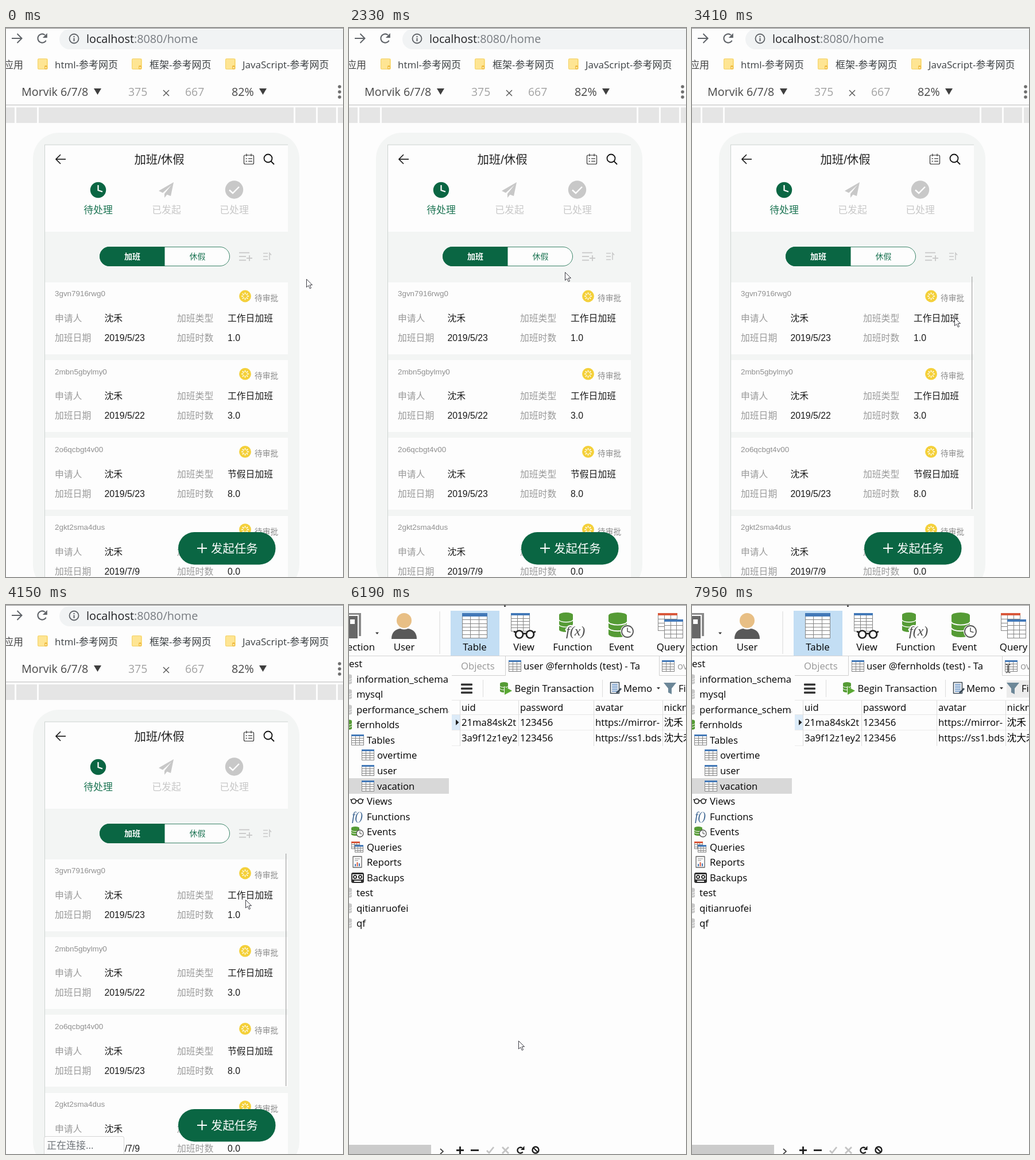
An HTML page with a canvas that plays this animation: 587x954 px, repeating every 8000 ms.

```html
<!DOCTYPE html>
<html lang="zh-CN">
<head>
<meta charset="utf-8">
<title>Screen recording</title>
<style>
html, body { margin: 0; width: 587px; height: 954px; overflow: hidden; background: #fdfdfd; }
canvas { display: block; }
</style>
</head>
<body>
<canvas id="stage" width="587" height="954"></canvas>
<script>
const c = document.getElementById('stage').getContext('2d');
const LOOP = 8000, TAU = Math.PI * 2;
const UI = '"Open Sans","Noto Sans CJK SC","Noto Sans CJK",sans-serif';
const PAGE = '"Liberation Sans","Noto Sans CJK SC","Noto Sans CJK",sans-serif';
const BG = '#fdfdfd', PALE = '#f3f5f4', GREEN = '#0a6643', DBGREEN = '#559b35', BLUE = '#4379b8', RED = '#d9583b';

// ---------- helpers ----------
function rect(x, y, w, h, col) { c.fillStyle = col; c.fillRect(x, y, w, h); }
function pill(x, y, w, h, r, col) {
  c.beginPath(); c.roundRect(x, y, w, h, r); c.fillStyle = col; c.fill();
}
function outline(x, y, w, h, r, col, lw = 1) {
  c.beginPath(); c.roundRect(x, y, w, h, r); c.strokeStyle = col; c.lineWidth = lw; c.stroke();
}
function disc(x, y, r, col) { c.beginPath(); c.arc(x, y, r, 0, TAU); c.fillStyle = col; c.fill(); }
function ring(x, y, r, col, w = 1.5, a = 0, b = TAU) {
  c.beginPath(); c.arc(x, y, r, a, b); c.strokeStyle = col; c.lineWidth = w; c.stroke();
}
function trace(p) {
  c.beginPath();
  for (let i = 0; i < p.length; i += 2) c.lineTo(p[i], p[i + 1]);
}
function line(p, col, w = 1) { trace(p); c.strokeStyle = col; c.lineWidth = w; c.stroke(); }
function poly(p, col) { trace(p); c.closePath(); c.fillStyle = col; c.fill(); }
// y is the middle of the capitals
function text(s, x, y, size, col, font = UI, weight = 400, align = 'left') {
  c.font = weight + ' ' + size + 'px ' + font;
  c.textAlign = align;
  c.fillStyle = col;
  c.fillText(s, x, Math.round(y + size * 0.36));
}
function clip(x, y, w, h, draw) {
  c.save(); c.beginPath(); c.rect(x, y, w, h); c.clip(); draw(); c.restore();
}

// ---------- cursor ----------
// [start, end, steps, x0, y0, x1, y1, ...]
const moves = [
  [270, 810, 5, 523, 436, 376, 396, 440, 500, 535, 587],
  [1370, 2330, 8, 535, 587, 376, 424],
  [2450, 2960, 5, 376, 424, 457, 503],
  [4150, 4150, 1, 457, 503, 417, 512],
  [4290, 5100, 7, 417, 512, 260, 259],
  [5530, 5930, 4, 260, 259, 300, 980],
  [6170, 6450, 3, 217, 847, 451, 577],
  [6610, 6610, 1, 451, 577, 620, 240],
  [6990, 7950, 7, 602, 225, 580, 180, 560, 146, 550, 110]
];
function cursorAt(t) {
  let pos = [523, 436];
  for (const [t0, t1, n, ...p] of moves) {
    if (t < t0) break;
    const step = n > 1 ? (t1 - t0) / (n - 1) : 1;
    const k = Math.min(n, 1 + Math.floor((t - t0) / step + 1e-6));
    const legs = p.length / 2 - 1, u = k / n * legs;
    const i = Math.min(legs - 1, Math.floor(u)), f = u - i;
    pos = [0, 1].map(a => p[2 * i + a] + (p[2 * i + 2 + a] - p[2 * i + a]) * f);
  }
  return pos.map(Math.round);
}
function drawCursor(x, y, beam) {
  c.save();
  c.translate(x + 0.5, y + 0.5);
  if (beam) {
    line([-4, -7, -1, -7, 0, -6, 1, -7, 4, -7], '#222');
    line([0, -6, 0, 6], '#222', 1.6);
    line([-4, 7, -1, 7, 0, 6, 1, 7, 4, 7], '#222');
  } else {
    poly([0, 0, 0, 14, 3.3, 11, 5.8, 16.3, 8, 15.3, 5.6, 10.2, 10, 10], '#fff');
    c.closePath();
    c.strokeStyle = '#3c3c44'; c.lineWidth = 1; c.stroke();
  }
  c.restore();
}

// ---------- browser ----------
function folder(x) {
  pill(x, 53, 18, 19, 2, '#fee593');
  outline(x + 0.5, 53.5, 16, 18, 2, '#f3d165');
  pill(x + 12, 65, 5, 7, 2, '#f0bd45');
  disc(x + 14.5, 69, 1.3, '#fff3c4');
}
function browser(path, loading, canForward) {
  const ink = '#5f6368', fwd = canForward ? ink : '#bdc0c3';
  line([10, 18, 27, 18], fwd, 2);
  line([19.5, 10, 27.5, 18, 19.5, 26], fwd, 2);
  if (loading) {
    line([57, 12, 69, 24], ink, 2);
    line([69, 12, 57, 24], ink, 2);
  } else {
    ring(63, 18, 7.6, ink, 2.1, 0.5, 5.4);
    poly([71.8, 9, 71.8, 17, 63.8, 17], ink);
  }
  pill(93, 2, 530, 35, 17.5, '#f1f3f4');
  ring(118.5, 18.5, 8, ink, 1.8);
  rect(117.5, 17.5, 2, 5.5, ink);
  rect(117.5, 14, 2, 2, ink);
  text('localhost', 140, 18.5, 19.8, '#202124');
  text(':8080/' + path, 140 + c.measureText('localhost').width, 18.5, 19.8, '#777b80');

  text('应用', -4, 63.5, 17, '#444');
  [[55, 85, 'html-参考网页'], [219, 250, '框架-参考网页'], [382, 412, 'JavaScript-参考网页']].forEach(([fx, x, s]) => {
    folder(fx);
    text(s, x, 63.5, 17, '#3c4043');
  });

  text('Morvik 6/7/8', 27, 111, 19.7, '#484848');
  text('375', 213, 111, 19.4, '#a3a3a3');
  line([274, 108, 284, 118], '#5a5a5a', 1.5);
  line([284, 108, 274, 118], '#5a5a5a', 1.5);
  text('667', 312, 111, 19.4, '#a3a3a3');
  text('82%', 393, 111, 19.7, '#484848');
  for (const x of [153, 441]) poly([x, 105, x + 13, 105, x + 6.5, 116], '#3f3f3f');
  for (const y of [102, 111, 120]) disc(581, y, 2.8, '#6e6e6e');
  rect(0, 133, 587, 1.5, '#cdcdcd');

  rect(0, 138, 587, 27, '#e5e5e5');
  for (const x of [15, 54, 501, 540, 575]) rect(x, 138, 3, 27, BG);

  pill(47, 182, 464, 796, 45, PALE);
  rect(67, 202.5, 424, 760, '#cdd4d1');
  rect(68, 203.5, 423, 760, BG);
}

// ---------- overtime list ----------
const cards = [
  ['3gvn7916rwg0', '工作日加班', '2019/5/23', '1.0'],
  ['2mbn5gbylmy0', '工作日加班', '2019/5/22', '3.0'],
  ['2o6qcbgt4v00', '节假日加班', '2019/5/23', '8.0'],
  ['2gkt2sma4dus', '工作日加班', '2019/7/9', '0.0']
];
function card([id, type, date, hours], y) {
  const label = '#999', ink = '#1a1a1a';
  rect(68, Math.round(y), 423, 125, BG);
  text(id, 85, y + 19.5, 13.4, '#909090', PAGE);
  disc(416.5, y + 24, 10.4, '#f4d03a');
  for (let i = 0; i < 8; i++) {
    const a = i * TAU / 8, x = Math.cos(a), v = Math.sin(a);
    line([416.5 + x * 3.2, y + 24 + v * 3.2, 416.5 + x * 6.4, y + 24 + v * 6.4], '#fff', 1.6);
  }
  text('待审批', 433, y + 27, 13.7, '#8a8a8a', PAGE);
  text('申请人', 85, y + 62.5, 15.8, label, PAGE);
  text('沈禾', 171.5, y + 62.5, 15.8, ink, PAGE);
  text('加班类型', 298, y + 62.5, 15.8, label, PAGE);
  text(type, 386, y + 62.5, 15.8, ink, PAGE);
  text('加班日期', 85, y + 96.5, 15.8, label, PAGE);
  text(date, 171.5, y + 96.5, 15.8, ink, PAGE);
  text('加班时数', 298, y + 96.5, 15.8, label, PAGE);
  text(hours, 386, y + 96.5, 15.8, ink, PAGE);
}
function home() {
  const grey = '#c8c8c8';
  line([87, 228, 104, 228], '#111', 1.6);
  line([95, 220, 87, 228, 95, 236], '#111', 1.6);
  text('加班/休假', 267, 228.5, 20.4, '#222', PAGE, 400, 'center');
  outline(414.5, 221, 17, 15.5, 2, '#333', 1.2);
  line([419, 218.5, 419, 223], '#333', 1.2);
  line([427, 218.5, 427, 223], '#333', 1.2);
  for (const y of [227, 231.5]) {
    line([417.5, y, 420, y], '#333', 1.2);
    line([422, y, 429, y], '#333', 1.2);
  }
  ring(456.5, 226.5, 7, '#111', 1.8);
  line([461.5, 231.5, 467, 237], '#111', 1.8);

  disc(160.5, 281.5, 13.7, GREEN);
  line([160.5, 273, 160.5, 282, 168, 284.5], '#fff', 2.2);
  poly([292, 268, 266, 283, 273, 286.5, 288, 273, 276, 288, 276, 295, 280.5, 289.5, 287, 292], grey);
  disc(397.5, 281, 15.7, grey);
  line([389, 281.5, 395, 287, 406, 276], '#fff', 2.4);
  [['待处理', 160.5, '#1c7453'], ['已发起', 279.5, grey], ['已处理', 397.5, grey]].forEach(([s, x, col]) =>
    text(s, x, 315.5, 16.9, col, PAGE, 400, 'center'));

  rect(68, 354, 423, 610, PALE);
  pill(163, 380, 227, 34, 17, BG);
  outline(163.5, 380.5, 226, 33, 16.5, '#3a8468');
  pill(163, 380, 113.5, 34, [17, 0, 0, 17], GREEN);
  text('加班', 220, 397, 14, '#fff', PAGE, 700, 'center');
  text('休假', 333.5, 397, 14, '#1c7453', PAGE, 400, 'center');
  for (const [x, y] of [[424, 390.5], [418, 397], [418, 403.5]]) line([406, y, x, y], grey, 1.8);
  line([419, 400, 429, 400], grey, 1.8);
  line([424, 395, 424, 405], grey, 1.8);
  for (const y of [391.5, 397, 402.5]) line([448, y, 456, y], grey, 1.5);
  line([459, 403, 459, 391, 462, 394.5], grey, 1.5);

  cards.forEach((d, i) => card(d, 442 + i * 135.2));

  pill(300, 876, 169.5, 56.5, 28, GREEN);
  line([333, 904, 350, 904], '#fff', 2);
  line([341.5, 895.5, 341.5, 912.5], '#fff', 2);
  text('发起任务', 357, 905, 20.4, '#fff', PAGE);
}
function connecting() {
  pill(66, 923, 140, 40, 4, '#d5d5d5');
  pill(67, 924, 138, 40, 3, BG);
  text('正在连接...', 71, 939, 17, '#70757a');
}

function menu(x, y) {
  c.save();
  c.shadowColor = 'rgba(0,0,0,.45)'; c.shadowBlur = 4; c.shadowOffsetY = 2;
  rect(377, 423, 220, 403, '#b9b9b9');
  c.restore();
  rect(378, 424, 220, 401, BG);
  const rows = [
    [446, '返回(B)'], [477, '前进(F)'], [508.5, '重新加载(R)'], [555.5, '另存为(A)...'],
    [587, '打印(P)...'], [618.5, '投射(C)...'], [650, '翻成中文（简体）(T)'],
    [696.5, '当前页地址生成二维码'], [728, 'JSONView'], [775, '查看网页源代码(V)'], [806, '检查(N)']
  ];
  for (const [cy, s] of rows) {
    if (x > 378 && Math.abs(y - cy) < 15.5) rect(378, Math.floor(cy - 17), 209, 32, '#e8e9ed');
    text(s, 421.5, cy, 16.8, '#111');
  }
  for (const cy of [529, 671, 749]) rect(379, cy, 208, 1, '#e3e3e3');
  rect(389.5, 685, 22, 22, '#23982a');
  disc(400, 727, 11, '#85a1cb');
}

// ---------- login ----------
function login(caret) {
  text('手机号码', 90, 259.5, 18.3, '#7c7c7c', PAGE);
  text('密码', 90, 328, 18.3, '#7c7c7c', PAGE);
  rect(90, 293, 378, 1.3, '#e2e2e2');
  rect(90, 361, 378, 1.3, '#e2e2e2');
  pill(90, 373, 378, 57, 28.5, '#808080');
  text('登陆', 279, 402, 16, '#fff', PAGE, 500, 'center');
  if (caret) rect(90.5, 249, 1, 21, '#555');
}

// ---------- database client ----------
function grid(x, y, w, h, head = BLUE, rows = 5) {
  const top = Math.max(3, Math.round(h * 0.13));
  rect(x, y, w, h, '#fff');
  for (let i = 0; i <= 3; i++) rect(x + Math.round((w - 1) * i / 3), y, 1, h, '#858585');
  for (let i = 1; i <= rows; i++) rect(x, y + top + Math.round((h - top) * i / rows) - 1, w, 1, '#858585');
  rect(x, y, w, top, head);
}
// three stacked discs
function barrel(x, y, w, h, col) {
  const e = w * 0.17, cx = x + w / 2, r = w / 2, gap = Math.max(1, w * 0.06);
  c.beginPath();
  c.ellipse(cx, y + e, r, e, 0, Math.PI, TAU);
  c.ellipse(cx, y + h - e, r, e, 0, 0, Math.PI);
  c.closePath();
  c.fillStyle = col; c.fill();
  for (let i = 1; i < 3; i++) {
    c.beginPath();
    c.ellipse(cx, y + e + (h - 2 * e) * i / 3, r, e, 0, 0, Math.PI);
    c.strokeStyle = BG; c.lineWidth = gap; c.stroke();
  }
}
function clock(x, y, r) {
  disc(x, y, r, '#fff');
  ring(x, y, r, '#555', Math.max(1.3, r * 0.18));
  line([x, y - r * 0.65, x, y, x + r * 0.55, y + r * 0.15], '#555', Math.max(1.1, r * 0.15));
}
function glasses(x, y, r) {
  const w = Math.max(1.6, r * 0.42);
  for (const s of [-1, 1]) {
    disc(x + s * r * 1.45, y, r, '#fff');
    ring(x + s * r * 1.45, y, r, '#222', w);
    line([x + s * r * 2.3, y - r * 0.4, x + s * r * 2.9, y - r * 0.8], '#222', w);
  }
  line([x - r * 0.5, y - r * 0.2, x + r * 0.5, y - r * 0.2], '#222', w);
}
function func(s, x, y, size, col) {
  c.font = 'italic ' + size + 'px "Liberation Serif",serif';
  c.textAlign = 'left';
  c.lineJoin = 'round';
  c.strokeStyle = BG; c.lineWidth = size * 0.2;
  c.strokeText(s, x, y);
  c.fillStyle = col;
  c.fillText(s, x, y);
}

const tree = [
  [-6, 'test'], [13, 'information_schema'], [13, 'mysql'], [13, 'performance_schema'], [13, 'fernholds'],
  [31, 'Tables'], [49, 'overtime'], [49, 'user'], [49, 'vacation'], [31, 'Views'], [31, 'Functions'],
  [31, 'Events'], [31, 'Queries'], [31, 'Reports'], [31, 'Backups'], [13, 'test'], [13, 'qitianruofei'], [13, 'qf']
];
function sidebar() {
  const rowY = i => Math.round(102.3 + 26.53 * i);
  rect(0, 301, 174, 27, '#d8d8d8');
  clip(0, 90, 174, 480, () => tree.forEach(([x, s], i) => {
    const y = rowY(i);
    text(s, x, y, 16.7, '#000');
    if (x === 13) barrel(-10, y - 9, 15, 18, i === 4 ? DBGREEN : '#c9c9c9');
    if (x === 49) grid(22, y - 10, 22, 19, BLUE, 4);
  }));
  grid(4, rowY(5) - 10, 22, 19, BLUE, 4);
  glasses(14, rowY(9), 4);
  func('f()', 5, rowY(10) + 6, 20, '#38618f');
  barrel(4, rowY(11) - 9, 14, 16, DBGREEN);
  clock(19, rowY(11) + 3, 6);
  grid(4, rowY(12) - 10, 15, 13, RED, 3);
  grid(10, rowY(12) - 4, 15, 13, BLUE, 3);
  let y = rowY(13);
  outline(7, y - 10, 15, 19, 0, '#666', 1.3);
  line([10, y - 6, 19, y - 6], '#888');
  line([10, y - 3, 16, y - 3], '#888');
  rect(10, y + 3, 2, 4, BLUE); rect(13.5, y, 2, 7, RED); rect(17, y + 2, 2, 5, BLUE);
  y = rowY(14);
  pill(4, y - 9, 22, 18, 3, '#2f2f2f');
  rect(6, y - 6, 18, 9, '#fff');
  ring(10.5, y - 1.5, 2.6, '#222', 1.8);
  ring(19.5, y - 1.5, 2.6, '#222', 1.8);
  rect(9, y + 5, 12, 2, '#fff');
}
function ribbon() {
  rect(270, 0, 3, 3, '#333');
  rect(177, 10, 85, 78, '#c3def4');
  rect(0, 88, 587, 1, '#d4d4d4');
  rect(157.5, 11, 1, 74, '#d9d9d9');
  rect(-4, 14, 25, 40, '#8a8a8a');
  rect(-4, 17, 21, 41, '#fff');
  rect(-4, 19, 19, 39, '#676767');
  rect(2, 25, 8, 8, '#fff');
  poly([46, 47.5, 52, 47.5, 49, 51], '#333');
  c.beginPath();
  c.moveTo(74, 59);
  c.bezierCurveTo(74, 48, 80, 42, 90, 41);
  c.lineTo(102, 41);
  c.bezierCurveTo(112, 42, 118, 48, 118, 59);
  c.fillStyle = '#595959'; c.fill();
  disc(96, 28, 14.5, BG);
  disc(96, 27, 13, '#e8bf85');
  grid(197, 14, 44, 44, BLUE, 6);
  grid(282, 14, 33, 32, BLUE, 5);
  glasses(306, 51, 6.5);
  barrel(366, 13, 24, 34, DBGREEN);
  func('f(x)', 378, 53, 24, '#4a4a4a');
  barrel(452, 13, 32, 43, DBGREEN);
  disc(485, 46, 12, BG);
  clock(485, 46, 10);
  grid(538, 14, 34, 31, RED, 4);
  grid(549, 25, 33, 33, BLUE, 4);
  text('Connection', 45, 73, 16.9, '#000', UI, 400, 'right');
  [['User', 96], ['Table', 219], ['View', 304.5], ['Function', 389.5], ['Event', 474.5], ['Query', 560]].forEach(([s, x]) =>
    text(s, x, 73, 16.9, '#000', UI, 400, 'center'));
}
function table(hover) {
  const rule = '#dcdcdc', ink = '#000';
  text('Objects', 195, 106, 16.7, '#979797');
  line([179, 122.5, 272.5, 122.5, 272.5, 89], '#cfcfcf');
  line([540.5, 89, 540.5, 122.5, 587, 122.5], '#cfcfcf');
  grid(278, 96, 22, 20, BLUE, 4);
  clip(300, 90, 216, 32, () => text('user @fernholds (test) - Ta', 304, 106, 16.7, ink));
  grid(545, 96, 22, 20, BLUE, 4);
  text('overtime', 572, 106, 16.7, '#979797');

  for (const y of [138, 145, 152]) pill(195, y - 1.5, 20, 3.4, 1, '#333');
  rect(233, 130, 1, 30, rule);
  barrel(263, 134, 14, 18, DBGREEN);
  poly([270, 141, 284, 149, 270, 157], BG);
  poly([271, 142, 284, 149, 271, 156], '#5aa834');
  text('Begin Transaction', 288.5, 144.5, 16.7, ink);
  rect(441, 130, 1, 30, rule);
  outline(455.5, 134.5, 15, 19, 0, '#3c4a56', 1.5);
  for (let y = 138; y < 152; y += 3) line([458, y, 468, y], BLUE, 1.3);
  line([466, 153, 474, 145], '#3c4a56', 3);
  text('Memo', 478, 144.5, 16.7, ink);
  poly([536, 143, 542, 143, 539, 146.5], '#333');
  if (hover) rect(548, 131, 39, 30, '#ececec');
  poly([548, 135, 570, 135, 562, 145, 562, 155, 556, 152, 556, 145], '#6c8798');
  text('Filter', 574, 144.5, 16.7, ink);

  rect(179, 191, 14, 26, '#dcebf8');
  for (const y of [165, 190, 217, 244]) rect(179, y, y === 244 ? 15 : 408, 1, y > 190 ? '#ececec' : '#e6e6e6');
  for (const x of [193, 295, 426, 546]) rect(x, 166, 1, 79, rule);
  poly([186, 199, 191.5, 204, 186, 209], '#222');
  const cols = [
    [196, 99, 'uid', '21ma84sk2t', '3a9f12z1ey2'],
    [298, 128, 'password', '123456', '123456'],
    [429, 117, 'avatar', 'https://mirror-', 'https://ss1.bds'],
    [548.5, 60, 'nickname', '沈禾', '沈大禾']
  ];
  for (const [x, w, ...cells] of cols)
    clip(x - 1, 166, w, 80, () => cells.forEach((s, i) => text(s, x, 177.5 + 26.8 * i, 16.7, ink)));
}
function footer() {
  const ink = '#1c1c1c', off = '#c4c4c4';
  rect(0, 938, 143, 16, '#cbcbcb');
  line([159, 945, 164, 949.5, 159, 954], '#444', 1.8);
  line([187, 947.5, 200, 947.5], ink, 2.8);
  line([193.5, 941, 193.5, 954], ink, 2.8);
  line([212, 947.5, 226, 947.5], ink, 2.8);
  line([240, 948, 244, 952, 252, 942], off, 2.8);
  line([267, 942, 278, 953], off, 2.8);
  line([278, 942, 267, 953], off, 2.8);
  ring(298.5, 947.5, 5, ink, 2.4, 0.6, 5.4);
  poly([305.5, 940, 305.5, 947, 299, 947], ink);
  ring(325, 947, 5.5, ink, 2.4);
  line([321, 943, 329, 951], ink, 2.2);
}

// ---------- scenes ----------
function draw(t) {
  const [x, y] = cursorAt(t);
  rect(0, 0, 587, 954, BG);
  if (t < 6040) {
    const atLogin = t >= 4400;
    const blank = t >= 3170 && t < 3400;
    browser(atLogin ? 'login' : 'home', blank || (t >= 4270 && t < 4400), !atLogin);
    if (atLogin) login(t >= 5220 && t < 5720);
    else if (!blank) home();
    if (t >= 3400 && !atLogin) rect(487, 432, 1.3, 404, '#a9a9a9');
    if (t >= 4150 && !atLogin) connecting();
    if (t >= 2450 && t < 3170) menu(x, y);
  } else {
    ribbon();
    sidebar();
    table(t >= 7470);
    footer();
  }
  rect(0, 0, 587, 1, '#8c8c8c');
  drawCursor(x, y, t > 7000 && y < 122);
}

const start = performance.now();
function frame() {
  draw((performance.now() - start) % LOOP);
  requestAnimationFrame(frame);
}
frame();
</script>
</body>
</html>
```
